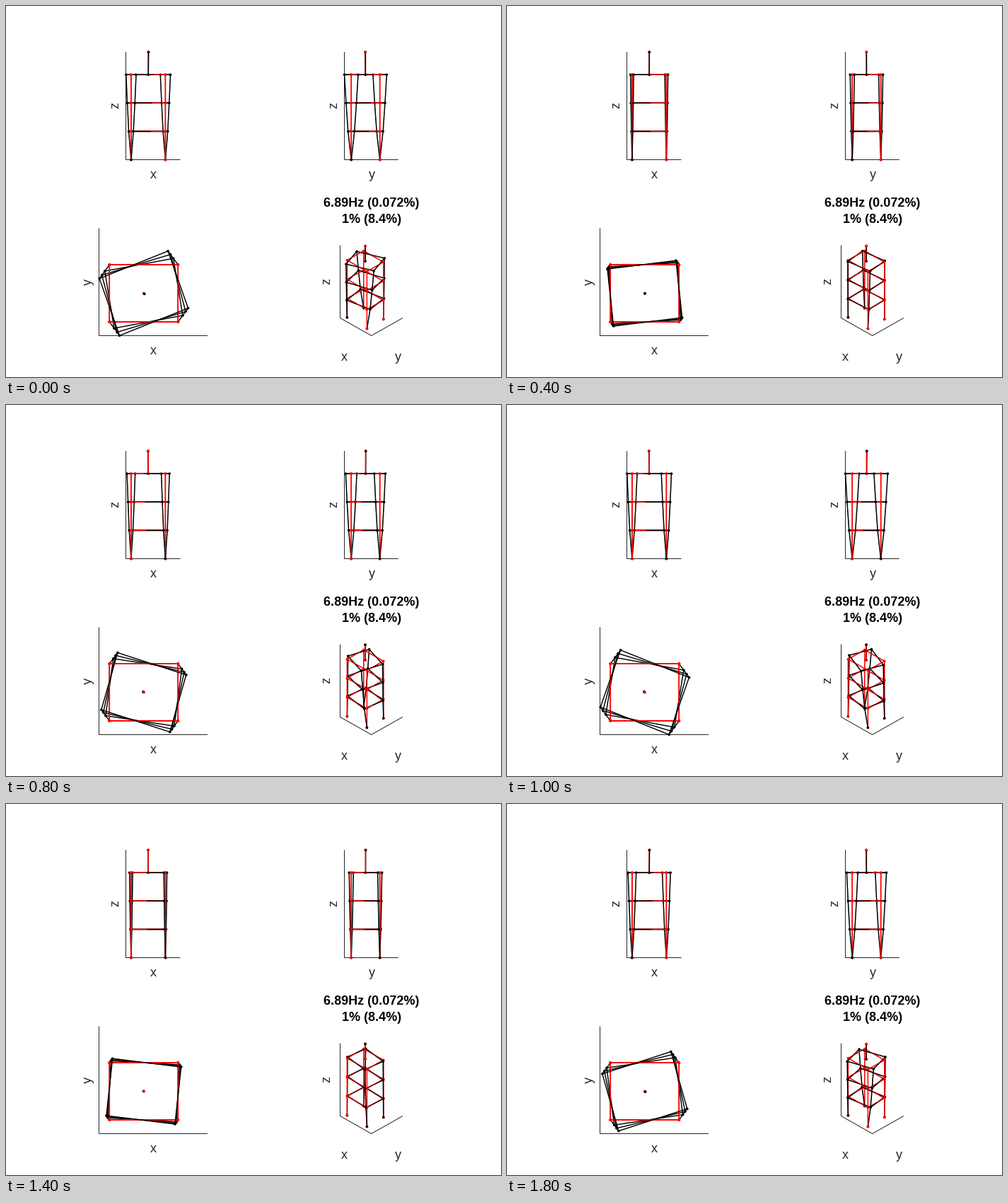
Recreate the animation shown at these times as a matplotlib script. Size 700 px wide and 525 px high, loop 2 s.

```python
import numpy as np
import matplotlib.pyplot as plt
from matplotlib.animation import FuncAnimation
from matplotlib.collections import LineCollection

W, H, DPI = 700, 525, 100
PX = 72 / DPI
FRAMES, INTERVAL = 10, 200
INK = "#262626"
LINE, DOT = 1.45 * PX, 3.7 * PX
BOX = {"x": (76.5, 0, 0), "y": (0, 75.75, 0), "z": (0, 0, 152)}

# Tower: a rectangular frame of three storeys with a mast on the roof.
CENTER = np.array([31.65, 29.95])
HALF = np.array([24.25, 20.2])
STOREYS, STOREY, MAST = 3, 40.1, 32
SPIN = np.array([-0.352, 0.4])
SWAY = np.array([0.5, -0.45, 0])


def build():
    """Nodes at rest, their full displacement, and the bars between them."""
    arms = HALF * [(-1, 1), (1, 1), (1, -1), (-1, -1)]
    # The base keeps a trace of the twist, which settles what is in front.
    shares = np.linspace(0.001, 1, STOREYS + 1) ** 0.7
    rest, move, bars = [], [], []
    for k, share in enumerate(shares):
        for i, arm in enumerate(arms):
            rest.append([*(CENTER + arm), k * STOREY])
            move.append([*(share * SPIN * arm[::-1]), 0])
            if k:
                bars.append((4 * k + i, 4 * k + (i + 1) % 4))
                bars.append((4 * k + i - 4, 4 * k + i))
    roof = STOREYS * STOREY
    bars.append((len(rest), len(rest) + 1))
    rest += [[*CENTER, roof], [*CENTER, roof + MAST]]
    move += [0.3 * SWAY, SWAY]
    return np.array(rest), np.array(move), np.array(bars)


REST, MOVE, BARS = build()


class View:
    """Orthographic view; bars are cut in pieces and painted back to front."""

    def __init__(self, origin, axes, azimuth, elevation, scale=1, pieces=12, tip=1):
        az, el = np.radians([azimuth, elevation])
        self.origin, self.axes = np.array(origin), axes
        right = np.array([np.cos(az), np.sin(az), 0])
        self.eye = np.array([np.sin(az) * np.cos(el), -np.cos(az) * np.cos(el), np.sin(el)])
        up = np.cross(self.eye, right)
        self.matrix = scale * np.column_stack([right, -up])
        self.pieces, self.tip = pieces, tip

    def project(self, points):
        return self.origin + np.asarray(points) @ self.matrix

    def frame(self):
        first, *others = [np.array(BOX[a]) for a in self.axes]
        corners = np.cumsum([np.zeros(3), *others], axis=0)
        return self.project(np.vstack([first, corners]))

    def strokes(self, amp):
        segs, depths, widths, colors = [], [], [], []
        t = np.linspace(0, 1, self.pieces + 1)[:, None]
        for nodes, color, lead in ((REST, "red", 0), (REST + amp * MOVE, "black", amp)):
            for a, b in nodes[BARS]:
                path = a + t * (b - a)
                flat = self.project(path)
                segs += list(np.stack([flat[:-1], flat[1:]], axis=1))
                depths += list((path[:-1] + path[1:]) @ self.eye / 2)
            dots = self.project(nodes)
            segs += list(np.stack([dots - [0.03, 0], dots + [0.03, 0]], axis=1))
            near = nodes @ self.eye + 0.3
            near[-1] = REST[-1] @ self.eye + 1 + self.tip * lead
            depths += list(near)
            widths += [LINE] * (len(BARS) * self.pieces) + [DOT] * len(nodes)
            colors += [color] * (len(segs) - len(colors))
        order = np.argsort(depths, kind="stable")
        return [np.array(part)[order] for part in (segs, widths, colors)]


FLAT = [
    View((169.5, 217.5), "zx", 0, 0),
    View((478.5, 217.5), "zy", 90, 0, tip=-1),
    View((131.5, 466.5), "yx", 0, 90, scale=2, pieces=1),
]
SOLID = View((472.5, 441.5), "zxy", 45, 34.5, scale=0.817, tip=-1)
VIEWS = FLAT + [SOLID]

fig = plt.figure(figsize=(W / DPI, H / DPI), dpi=DPI, facecolor="white")
ax = fig.add_axes([0, 0, 1, 1])
ax.set_xlim(0, W)
ax.set_ylim(H, 0)
ax.axis("off")


def label(x, y, text, turn=0, **style):
    style = {"color": INK, **style}
    ax.text(x, y, text, rotation=turn, rotation_mode="anchor", ha="center",
            va="baseline", family="Liberation Sans", size=18 * PX, **style)


for view in VIEWS:
    path = view.frame()
    ax.plot(*path.T, color=INK, lw=PX, solid_joinstyle="miter", snap=False, zorder=1)
    gap = 14 if view is SOLID else 10.2
    label(path[1, 0] - gap, path[:2, 1].mean() - 0.7, view.axes[0], 90)
for view in FLAT:
    path = view.frame()
    label(path[1:, 0].mean() + 0.7, path[1, 1] + 26.8, view.axes[1])
label(478, 502.5, "x")
label(554, 502.5, "y")
label(516.8, 284.4, "6.89Hz (0.072%)", weight="bold", color="black")
label(517, 306.6, "1% (8.4%)", weight="bold", color="black")

towers = [LineCollection([], capstyle="round", zorder=2) for _ in VIEWS]
for tower in towers:
    tower.set_snap(False)
    ax.add_collection(tower, autolim=False)


def draw(i):
    amp = np.cos(2 * np.pi * i / FRAMES)
    for view, tower in zip(VIEWS, towers):
        segs, widths, colors = view.strokes(amp)
        tower.set_segments(segs)
        tower.set_linewidths(widths)
        tower.set_color(colors)
    return towers


anim = FuncAnimation(fig, draw, frames=FRAMES, interval=INTERVAL,
                     repeat=True, repeat_delay=0)
plt.show()
```
